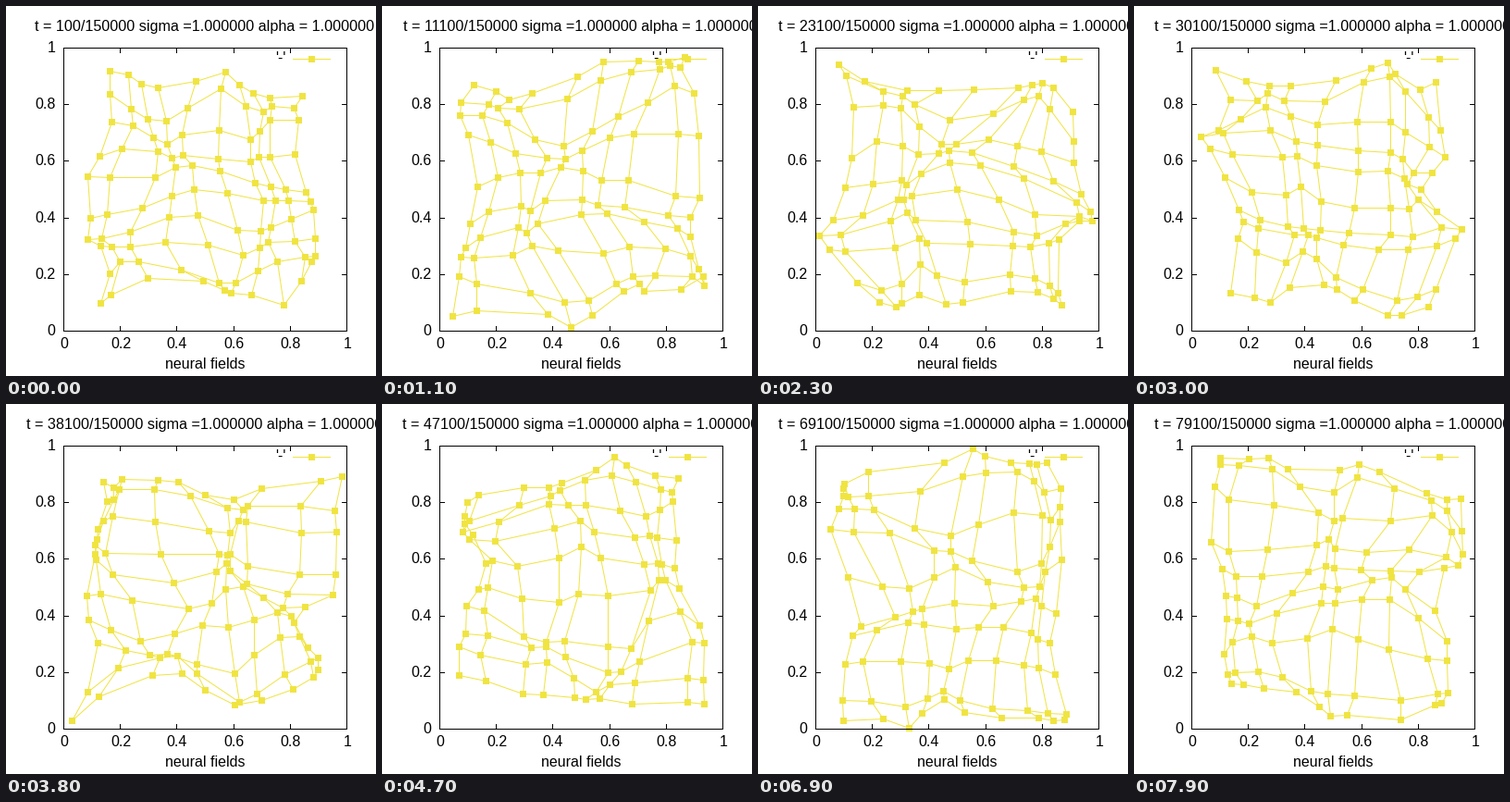
A matplotlib script for the animation above (8000 ms loop, 400 by 400 pixels).

```python
import numpy as np
import matplotlib.pyplot as plt
from matplotlib.animation import FuncAnimation
from matplotlib.collections import LineCollection

FRAMES, N = 80, 10
PX = 0.72  # points per pixel at 100 dpi
GOLD = "#f0e442"
L, R, T, B = 62, 368, 45, 351

plt.rcParams["font.family"] = "Liberation Sans"
fig = plt.figure(figsize=(4, 4), dpi=100, facecolor="white")
ax = fig.add_axes([0, 0, 1, 1])
ax.set(xlim=(0, 400), ylim=(400, 0))
ax.axis("off")

ROW, COL = np.mgrid[0:N, 0:N]


def train(seed, steps=300, sigma=1.0, alpha=1.0):
    """Self-organising map of the unit square after random stimuli."""
    rng = np.random.default_rng(seed)
    w = np.stack([COL, ROW], axis=-1) / (N - 1)
    for x in rng.random((steps, 2)):
        diff = x - w
        r, c = divmod(int((diff ** 2).sum(axis=-1).argmin()), N)
        near = np.exp(-((ROW - r) ** 2 + (COL - c) ** 2) / (2 * sigma ** 2))
        w += alpha * near[..., None] * diff
    return w


def text(x, y, s, ha="center", size=16):
    return ax.text(x, y, s, ha=ha, va="baseline", fontsize=size * PX, zorder=1)


def line(xs, ys, color="black", z=4):
    ax.plot(xs, ys, color=color, lw=PX, snap=True, zorder=z)


def squares(xs, ys, z):
    return ax.plot(xs, ys, "s", color=GOLD, ms=7 * PX, mew=0, zorder=z)[0]


# Frame, ticks and labels
line([L, R, R, L, L], [T, T, B, B, T])
for i in range(6):
    label = f"{i / 5:g}"
    x, y = round(L + (R - L) * i / 5), round(B + (T - B) * i / 5)
    text(x + 1, 370, label)
    text(53.5, y + 5, label, "right")
    for edge, step in ((B, -5), (T, 5)):
        line([x, x], [edge, edge + step])
    for edge, step in ((L, 5), (R, -5)):
        line([edge, edge + step], [y, y])

text(215, 392, "neural fields")
title = text(214.5, 27, "", size=16.15)

# Legend lies under the sheet
text(302, 61, "'-'", "right")
line([310, 350], [57, 57], GOLD, 1)
squares([330], [57], 1)

mesh = LineCollection([], colors=GOLD, linewidths=PX, zorder=2)
ax.add_collection(mesh, autolim=False)
nodes = squares([], [], 3)


def draw(k):
    w = np.round([L, B] + train(k) * [R - L, T - B])
    mid = w + 0.5  # pixel centres
    mesh.set_segments([*mid, *mid.transpose(1, 0, 2)])
    nodes.set_data(w[..., 0].ravel(), w[..., 1].ravel())
    title.set_text(f"t = {100 + 1000 * k}/150000 sigma =1.000000 alpha = 1.000000")
    return mesh, nodes, title


anim = FuncAnimation(fig, draw, frames=FRAMES, interval=100, repeat=True, repeat_delay=0)
plt.show()
```
